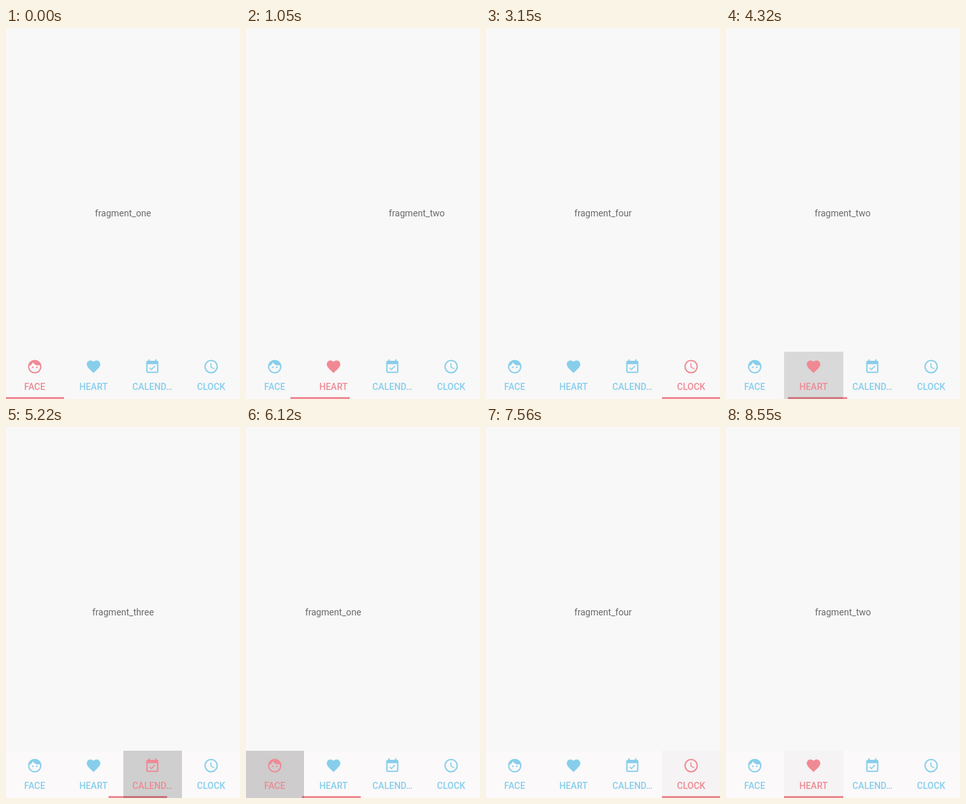
An HTML page with a canvas for the animation above (9270 ms loop, 363x573 px).

```html
<!DOCTYPE html>
<html lang="en">
<head>
<meta charset="utf-8">
<title>Tab pager</title>
<style>
  html, body { margin: 0; width: 100%; height: 100%; overflow: hidden; background: #f8f8f8; }
  canvas { display: block; }
</style>
</head>
<body>
<canvas id="stage" width="363" height="573"></canvas>
<script>
const W = 363, H = 573, BAR = 500;
const LOOP = 9270, STEP = 30;
const PINK = '#ef8a94', BLUE = '#87ceeb', GREY = '#6a6a6a', BG = '#f8f8f8', BAR_BG = '#fbf9fa';
const TINT_FROM = 5010;
const ctx = document.getElementById('stage').getContext('2d');

const circle = (x, y, r) => `M${x - r} ${y}a${r} ${r} 0 1 0 ${2 * r} 0a${r} ${r} 0 1 0 ${-2 * r} 0z`;

const tabs = [
  { label: 'FACE', page: 'fragment_one', cy: 12, icon: circle(12, 12, 10) +
    'M4.05 11.14A10 10 0 0 0 9.26 5.77A10 10 0 0 0 19.67 9.74A8 8 0 1 1 4.05 11.14z' +
    circle(9, 13, 1.25) + circle(15, 13, 1.25) },
  { label: 'HEART', page: 'fragment_two', cy: 12, icon:
    'M12 21.35l-1.45-1.32C5.4 15.36 2 12.28 2 8.5 2 5.42 4.42 3 7.5 3c1.74 0 3.41.81 4.5 2.09' +
    'C13.09 3.81 14.76 3 16.5 3 19.58 3 22 5.42 22 8.5c0 3.78-3.4 6.86-8.55 11.54z' },
  { label: 'CALEND…', page: 'fragment_three', cy: 11.6, icon:
    'M19 3h-1V1h-2v2H8V1H6v2H5a2 2 0 0 0-2 2v14a2 2 0 0 0 2 2h14a2 2 0 0 0 2-2V5a2 2 0 0 0-2-2z' +
    'M19 19H5V8h14zM16.53 11.06L15.47 10l-4.88 4.88-2.12-2.12-1.06 1.06L10.59 17z' },
  { label: 'CLOCK', page: 'fragment_four', cy: 12, icon:
    circle(12, 12, 10) + circle(12, 12, 8) + 'M12.5 7H11v6l5.25 3.15.75-1.23-4.5-2.67z' }
];
tabs.forEach(tab => { tab.path = new Path2D(tab.icon); });

// Swipes follow the finger (progress per step); taps scroll the page and slide the line separately.
const moves = [
  { at: 990, from: 0, to: 1, drag: [.03, .18, .77, .95, .99, 1] },
  { at: 1980, from: 1, to: 2, drag: [.009, .08, .375, .88, .98, 1] },
  { at: 3030, from: 2, to: 3, drag: [.05, .36, .88, .98, 1] },
  { at: 4110, end: 4470, from: 3, to: 1, scroll: 4092, slide: 4089 },
  { at: 5010, end: 5490, from: 1, to: 2, scroll: 5060, slide: 5075 },
  { at: 6000, end: 6330, from: 2, to: 0, scroll: 5993, slide: 6013 },
  { at: 7080, end: 7560, from: 0, to: 3, scroll: 7120, slide: 7135 },
  { at: 8130, end: 8550, from: 3, to: 1, scroll: 8165, slide: 8180 }
];

const clamp = v => Math.max(0, Math.min(1, v));
const lerp = (a, b, k) => a + (b - a) * k;
const quintOut = k => 1 - (1 - k) ** 5;
const edge = i => Math.max(0, Math.round(91.3 * i - 1.1));
const center = i => 44.6 + 91.2 * i;

// cubic-bezier(.4, 0, .2, 1)
function standardEase(x) {
  let lo = 0, hi = 1;
  for (let i = 0; i < 24; i++) {
    const s = (lo + hi) / 2, r = 1 - s;
    if (1.2 * r * r * s + .6 * r * s * s + s ** 3 < x) lo = s; else hi = s;
  }
  return lo * lo * (3 - 2 * lo);
}

function stateAt(t) {
  const move = moves.filter(m => m.at <= t).pop();
  if (!move) return { page: 0, line: 0, active: 0 };
  const { from, to, drag } = move;
  if (drag) {
    const k = drag[Math.min(drag.length - 1, Math.floor((t - move.at) / STEP))];
    const pos = lerp(from, to, k);
    return { page: pos, line: pos, active: k < .5 ? from : to };
  }
  const time = (Math.abs(to - from) + 1) * 100;
  return {
    page: lerp(from, to, quintOut(clamp((t - move.scroll) / time))),
    line: lerp(from, to, standardEase(clamp((t - move.slide) / 300))),
    active: t >= move.scroll ? to : from,
    tap: move
  };
}

function drawRipple(tap, t) {
  const age = t - tap.at, k = age / (tap.end - tap.at);
  const rest = tap.at >= TINT_FROM ? .025 : 0;
  const x = edge(tap.to), w = edge(tap.to + 1) - x;
  const fade = 1 - clamp((k - .4) / .6);
  ctx.save();
  ctx.beginPath();
  ctx.rect(x, BAR, w, H - BAR);
  ctx.clip();
  ctx.fillStyle = `rgba(0,0,0,${Math.max(rest, .1 * clamp((age + 20) / 80) * fade)})`;
  ctx.fillRect(x, BAR, w, H - BAR);
  ctx.fillStyle = `rgba(0,0,0,${.09 * fade})`;
  ctx.beginPath();
  ctx.arc(x + w / 2, (BAR + H) / 2, 60 * clamp((age + 25) / 130), 0, 7);
  ctx.fill();
  ctx.restore();
}

function drawTab(tab, i, color) {
  const cx = center(i);
  ctx.fillStyle = color;
  ctx.save();
  ctx.translate(cx, 523);
  ctx.scale(1.05, 1.05);
  ctx.translate(-12, -tab.cy);
  ctx.fill(tab.path, 'evenodd');
  ctx.restore();
  ctx.font = '500 14px Roboto, sans-serif';
  ctx.fillText(tab.label, cx, 558.7);
}

function draw(t) {
  const s = stateAt(t);
  ctx.fillStyle = BG;
  ctx.fillRect(0, 0, W, H);
  ctx.textAlign = 'center';
  ctx.fillStyle = GREY;
  ctx.font = '14.1px Roboto, sans-serif';
  tabs.forEach((tab, i) => ctx.fillText(tab.page, W / 2 + (i - s.page) * W, 291));

  if (t >= TINT_FROM) {
    ctx.fillStyle = BAR_BG;
    ctx.fillRect(0, BAR, W, H - BAR);
  }
  const left = edge(s.line);
  ctx.fillStyle = PINK;
  ctx.fillRect(left, 570, edge(s.line + 1) - left, 3);
  if (s.tap) drawRipple(s.tap, t);
  tabs.forEach((tab, i) => drawTab(tab, i, i === s.active ? PINK : BLUE));
}

const start = performance.now();
function tick() {
  const t = (performance.now() - start) % LOOP;
  draw(Math.floor(t / STEP) * STEP);
  requestAnimationFrame(tick);
}
tick();
</script>
</body>
</html>
```
